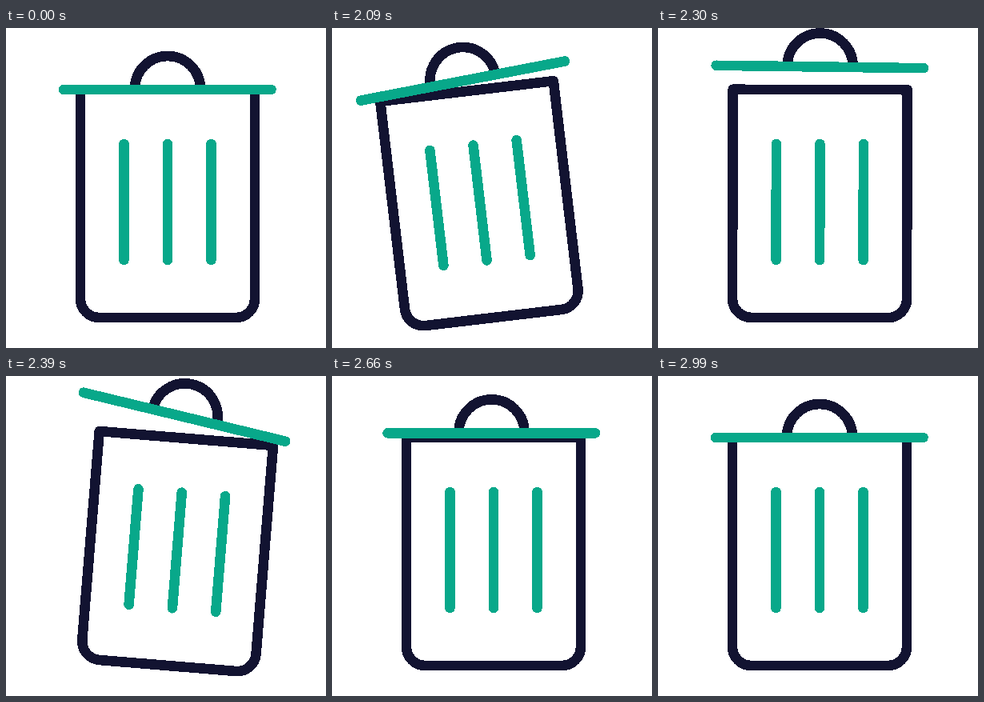
These frames come from a looping animation (400 by 400 pixels, 3.02 s). An HTML page:

```html
<!DOCTYPE html>
<html lang="en">
<head>
<meta charset="utf-8">
<title>Trash can</title>
<style>
  html, body { margin: 0; height: 100%; overflow: hidden; background: #fff; }
  svg { display: block; width: 100%; height: 100%; }
  path { fill: none; stroke-width: 12.6; stroke-linejoin: round; shape-rendering: crispEdges; }
  .ink { stroke: #121331; }
  .accent { stroke: #08a88a; stroke-linecap: round; }
</style>
</head>
<body>
<svg viewBox="0 0 400 400">
  <g id="can">
    <path class="ink" d="M93 77H311V338.500a23.500 23.500 0 0 1-23.500 23.500H116.500a23.500 23.500 0 0 1-23.500-23.500Z"/>
    <path class="accent" d="M147.500 145V290M202 145V290M256.500 145V290"/>
    <g id="lid">
      <path class="ink" d="M161 76a41 41 0 0 1 82 0"/>
      <path class="accent" d="M72 77H331.500"/>
    </g>
  </g>
</svg>
<script>
  const LOOP = 3020, START = 2030, STEP = 30;
  const can = document.getElementById('can');
  const lid = document.getElementById('lid');

  // Eased rise from 0 to 1 between two times in ms.
  function ramp(t, from, to) {
    const p = Math.min(1, Math.max(0, (t - from) / (to - from)));
    return p * p * (3 - 2 * p);
  }

  // Rises to 1 at the peak, then falls back to 0.
  const bump = (t, from, peak, to) => ramp(t, from, peak) - ramp(t, peak, to);

  function draw(now) {
    let t = now % LOOP;
    // The can rests first, then moves in steps.
    t = t < START ? 0 : START + Math.floor((t - START) / STEP) * STEP;

    const swing = 4.9 * bump(t, 2185, 2370, 2535) - 10 * bump(t, 1936, 2185, 2370);
    const tilt = 9 * (bump(t, 2190, 2400, 2640) - bump(t, 2000, 2190, 2400));
    const lift = 28.5 * (ramp(t, 1970, 2220) - ramp(t, 2310, 2800));
    const shift = -5 * bump(t, 1960, 2180, 2300) - 8.5 * bump(t, 2300, 2480, 2760);

    can.setAttribute('transform', `rotate(${swing} 202 362)`);
    lid.setAttribute('transform', `translate(${shift} ${-lift}) rotate(${tilt} 201.75 77)`);
  }

  const begin = performance.now();
  function tick() {
    draw(performance.now() - begin);
    requestAnimationFrame(tick);
  }
  tick();
</script>
</body>
</html>
```
